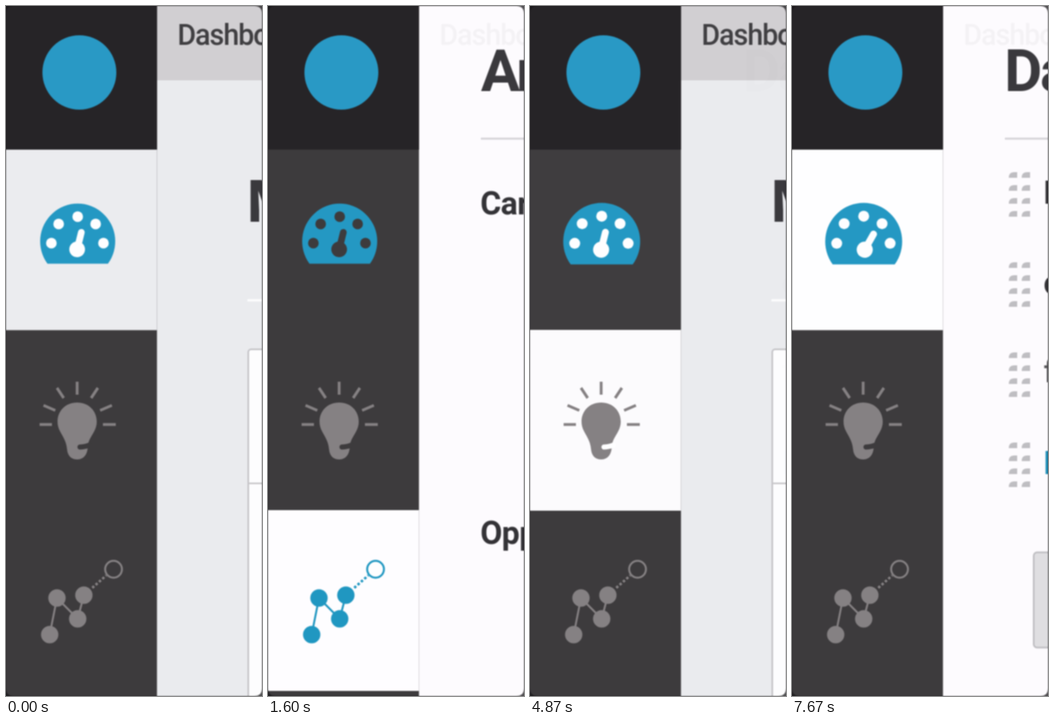
These frames come from a looping animation (457 px wide and 1225 px high, 7740 ms). An HTML page:

```html
<!DOCTYPE html>
<html lang="en">
<head>
<meta charset="utf-8">
<title>Sidebar</title>
<style>
  html, body { margin: 0; width: 100%; height: 100%; overflow: hidden; background: #eaebee; }
  svg { display: block; width: 100%; height: 100%; }
  text { font-family: Roboto, "Noto Sans", sans-serif; font-weight: 700; fill: #343337; }
  .crumb { font-size: 51px; font-weight: 500; letter-spacing: -1.8px; fill: #403f42; }
  .title { font-size: 104px; letter-spacing: -4px; fill: #3a393d; }
  .label { font-size: 57px; letter-spacing: -1px; }
  .icon line, .icon polyline { stroke: currentColor; fill: none; }
</style>
</head>
<body>
<svg viewBox="0 0 457 1225" preserveAspectRatio="none">
  <defs>
    <filter id="soft" filterUnits="userSpaceOnUse" x="-10" y="-10" width="477" height="1245" color-interpolation-filters="sRGB">
      <feGaussianBlur stdDeviation=".9"/>
    </filter>
    <g id="grip" fill="#bfbec2"></g>
    <g id="panelBase">
      <rect x="269" y="-10" width="200" height="1245" fill="#fdfbfe"/>
      <text class="crumb" x="306" y="69" opacity=".04">Dashboard</text>
      <path d="M380 235.500H470" stroke="#d5d3d8" stroke-width="3.500"/>
    </g>
  </defs>

  <g filter="url(#soft)">
    <g id="home">
      <rect x="269" y="-10" width="200" height="1245" fill="#eaebee"/>
      <rect x="269" y="-10" width="200" height="142" fill="#d1cfd2"/>
      <text class="crumb" x="306" y="69">Dashboard</text>
      <text class="title" x="430" y="383">My</text>
      <path d="M431 522.500H470" stroke="#fdfdfe" stroke-width="4"/>
      <rect x="432.500" y="609.500" width="60" height="640" rx="5" fill="#fdfdfe" stroke="#c6c5c9" stroke-width="3"/>
      <path d="M433 847.500H470" stroke="#c9c8cb" stroke-width="3"/>
    </g>

    <g id="analysis">
      <use href="#panelBase"/>
      <text class="title" x="380" y="151">Analysis</text>
      <text class="label" x="379" y="370">Cards</text>
      <text class="label" x="379" y="955">Opportunity</text>
    </g>
    <g id="discover">
      <use href="#panelBase"/>
      <text class="title" x="379" y="151">Discover</text>
      <rect x="381.500" y="321.500" width="120" height="143" rx="6" fill="#fefdff" stroke="#c3c2c6" stroke-width="3"/>
      <text x="438" y="416" style="font-size:66px;font-weight:400;fill:#626165">a</text>
      <text class="label" x="379" y="598">Revenue</text>
      <text class="label" x="379" y="1078">Status</text>
    </g>
    <g id="dashboards">
      <use href="#panelBase"/>
      <text class="title" x="379" y="151">Dashboards</text>
      <use href="#grip" y="300"/><use href="#grip" y="460"/>
      <use href="#grip" y="620"/><use href="#grip" y="780"/>
      <text class="label" x="449" y="351">Board</text>
      <text class="label" x="449" y="511">charts</text>
      <text class="label" x="449" y="668" style="font-weight:500;fill:#59585b">first</text>
      <text class="label" x="449" y="831" style="fill:#1f8fb8">Build</text>
      <rect x="431.500" y="970" width="70" height="169" rx="6" fill="#dfdee1" stroke="#bfbec2" stroke-width="3"/>
    </g>

    <rect x="-10" y="-10" width="279.500" height="1245" fill="#3d3b3d"/>
    <rect x="-10" y="-10" width="279.500" height="265" fill="#262427"/>
    <rect id="rowGauge" x="-10" y="255" width="279.500" height="320.500"/>
    <rect id="rowBulb" x="-10" y="575" width="279.500" height="321" fill="#fefdff"/>
    <rect id="rowGraph" x="-10" y="895" width="279.500" height="321" fill="#fefdff"/>
    <circle cx="131" cy="118" r="66" fill="#2999c5"/>

    <g id="gauge">
      <path d="M74 457.500A67 67 0 1 1 182 457.500Z" fill="#2498c3"/>
      <g id="gaugeDots"></g>
      <g id="needle">
        <circle r="14"/>
        <path d="M0 0V-31" stroke-width="12" stroke-linecap="round"/>
      </g>
    </g>

    <g id="bulb" class="icon">
      <path fill="currentColor" d="M127 704C148 704 162 719 162 738C162 756 148 764 146 781C146 797 138 805 127 805C116 805 110 798 109 787C107 764 92 757 92 738C92 719 106 704 127 704Z"/>
      <path id="notch" d="M132 783Q139 783 149 779.500" fill="none" stroke-width="9" stroke-linecap="round"/>
      <g id="rays" stroke-width="5"></g>
    </g>

    <g id="graph" class="icon">
      <polyline id="trend" points="78,1116 91,1051 128,1088 139,1046" pathLength="100" stroke-width="3.500"/>
      <line id="tail" x1="154" y1="1033" stroke-width="4.500" stroke-dasharray="4.500 3.500"/>
      <g id="graphDots" fill="currentColor"></g>
      <circle id="ring" cx="192" cy="1000" r="15" stroke="currentColor" stroke-width="3.500"/>
    </g>

    <path d="M-10 -10H467V1235H-10ZM14 0Q0 0 0 14V1211Q0 1225 14 1225H443Q457 1225 457 1211V14Q457 0 443 0Z" fill="#171618" fill-rule="evenodd" opacity=".75"/>
  </g>
</svg>

<script>
const LOOP = 7740, FADE = 300, FADE_DELAY = 5;
const HOVER = { graph: 770, bulb: 2570, gauge: 4850 };
const BLUE = '#2097c1', GREY = '#858183', DARK = '#3d3b3d', WHITE = '#fefeff';

const $ = id => document.getElementById(id);
const clamp = v => Math.min(1, Math.max(0, v));
const ramp = (t, start, length) => clamp((t - start) / length);
const ease = p => p * p * (3 - 2 * p);
const fade = (t, start) => ease(ramp(t, start + FADE_DELAY, FADE));

function set(node, attrs) {
  for (const key in attrs) node.setAttribute(key, attrs[key]);
}
function add(parent, tag, attrs) {
  const node = document.createElementNS('http://www.w3.org/2000/svg', tag);
  set(node, attrs);
  return $(parent).appendChild(node);
}

for (let row = 0; row < 4; row++)
  for (const x of [387, 410])
    add('grip', 'path', { d: `M${x} ${row * 23 + 5}Q${x} ${row * 23 - 5} ${x + 9} ${row * 23 - 5}H${x + 15}V${row * 23 + 5}Z` });

const gaugeDots = [[81, 421], [94, 387], [128, 374], [160, 387], [174, 421]]
  .map(([cx, cy]) => add('gaugeDots', 'circle', { cx, cy, r: 9.5 }));
const dotAngles = [-85, -45, 0, 50, 80];

const rays = [[82, 743, 60, 743], [88, 718, 67, 709], [103, 696, 91, 678], [127, 690, 127, 667],
              [152, 696, 164, 678], [168, 718, 189, 709], [173, 743, 196, 743]]
  .map(ends => ({ ends, node: add('rays', 'line', { x1: ends[0], y1: ends[1] }) }));

const graphDots = [[78, 1116, 0], [91, 1051, .41], [128, 1088, .73], [139, 1046, 1]]
  .map(([cx, cy, at]) => ({ at, node: add('graphDots', 'circle', { cx, cy }) }));

// time, needle angle
const swing = [[0, 14], [4880, 14], [5200, -85], [6070, 45], [6650, 86], [6870, 86], [7400, 36], [7740, 28]];
function needleAngle(t) {
  const i = swing.findIndex(([time]) => time > t);
  const [t0, a0] = swing[i - 1], [t1, a1] = swing[i];
  return a0 + (a1 - a0) * (t - t0) / (t1 - t0);
}

function drawPanels(t) {
  const { graph, bulb, gauge } = HOVER;
  $('analysis').style.opacity = t < bulb ? fade(t, graph) : 0;
  $('discover').style.opacity = t < gauge ? fade(t, bulb) : 0;
  $('dashboards').style.opacity = fade(t, gauge);
  $('rowGraph').style.opacity = fade(t, graph) - fade(t, bulb);
  $('rowBulb').style.opacity = fade(t, bulb) - fade(t, gauge);
  $('rowGauge').style.opacity = 1 - fade(t, graph) + fade(t, gauge);
  $('rowGauge').style.fill = t < bulb ? '#ebecef' : WHITE;
}

function drawGauge(t) {
  const hovered = t >= HOVER.gauge;
  const hole = hovered || t < HOVER.graph ? WHITE : DARK;
  const angle = needleAngle(t);
  const sweeping = t > 5050 && t < 6700;
  gaugeDots.forEach((dot, i) => set(dot, { fill: sweeping && angle < dotAngles[i] ? GREY : hole }));
  set($('needle'), {
    fill: hole, stroke: hole, 'stroke-width': 0,
    transform: `translate(${127 + (angle - 14) * .18} 432) rotate(${angle})`
  });
  const size = hovered ? 1.025 : 1;
  set($('gauge'), { transform: `translate(128 408) scale(${size}) translate(-128 -408)` });
}

function drawBulb(t) {
  const hovered = t >= HOVER.bulb && t < HOVER.gauge;
  $('bulb').style.color = hovered ? BLUE : GREY;
  set($('notch'), { stroke: $('rowBulb').style.opacity > .5 ? WHITE : DARK });
  rays.forEach(({ ends: [x1, y1, x2, y2], node }, i) => {
    const p = hovered ? ramp(t, 2600 + i * 70, 120) : 1;
    set(node, { x2: x1 + (x2 - x1) * p, y2: y1 + (y2 - y1) * p });
  });
}

function drawGraph(t) {
  const hovered = t >= HOVER.graph && t < HOVER.bulb;
  const trend = hovered ? ramp(t, HOVER.graph, 260) : 1;
  const tail = hovered ? ramp(t, 1030, 230) : 1;
  const ring = hovered ? ramp(t, 1260, 130) : 1;
  $('graph').style.color = hovered ? BLUE : GREY;
  set($('trend'), { 'stroke-dasharray': `${trend * 100} 200` });
  set($('tail'), { x2: 154 + 25 * tail, y2: 1033 - 22 * tail });
  graphDots.forEach(({ at, node }) =>
    set(node, { r: at ? 15.5 * ramp(trend + tail * .2, at, .12) : 15.5 }));
  set($('ring'), { opacity: ring, fill: hovered ? WHITE : 'none' });
}

function draw() {
  const t = performance.now() % LOOP;
  drawPanels(t);
  drawGauge(t);
  drawBulb(t);
  drawGraph(t);
  requestAnimationFrame(draw);
}
draw();
</script>
</body>
</html>
```
